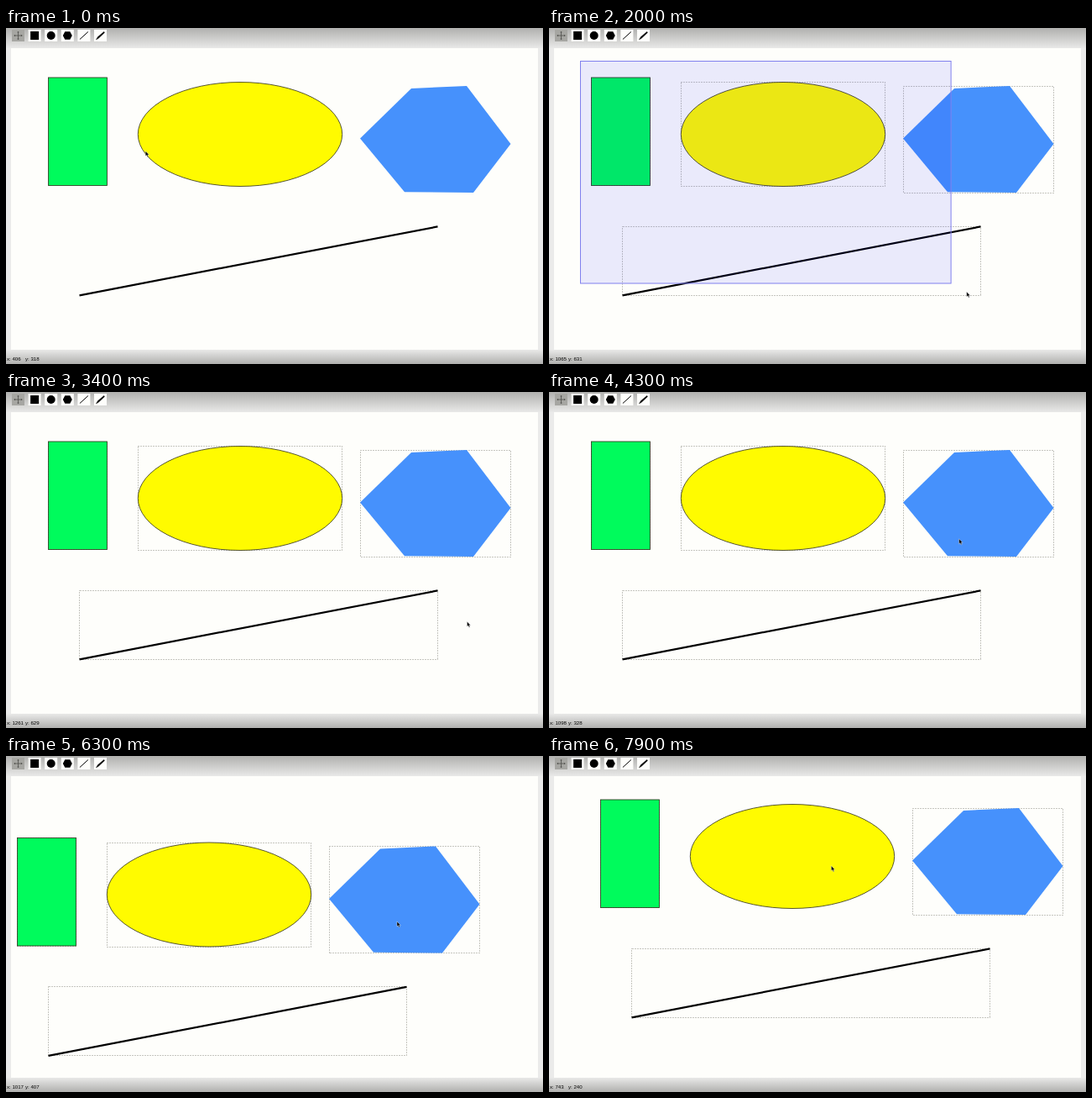
Animation, 640 px wide and 400 px high, one loop 8 s. Source, as an HTML page:

```html
<!DOCTYPE html>
<html lang="en">
<head>
<meta charset="utf-8">
<title>Shape editor</title>
<style>
  html, body { margin: 0; width: 100%; height: 100%; overflow: hidden; }
  svg { display: block; width: 640px; height: 400px; }
  text { font: 6.1px "Liberation Sans", Arial, sans-serif; fill: #000; }
  .box { fill: none; stroke: #c6c6c0; stroke-dasharray: 2 1; shape-rendering: crispEdges; }
  .edge { stroke: #2c2c18; stroke-width: .8; }
</style>
</head>
<body>
<svg viewBox="0 0 640 400">
  <defs>
    <linearGradient id="top" x2="0" y2="1">
      <stop stop-color="#b0b0ae"/>
      <stop offset="1" stop-color="#e9e9e8"/>
    </linearGradient>
    <linearGradient id="bottom" x2="0" y2="1">
      <stop stop-color="#e9e9e8"/>
      <stop offset="1" stop-color="#b0b0ae"/>
    </linearGradient>
  </defs>

  <rect width="640" height="400" fill="#ebebea"/>
  <rect width="640" height="24" fill="url(#top)"/>
  <rect y="383" width="640" height="17" fill="url(#bottom)"/>
  <rect x="6" y="24" width="628" height="359" fill="#fefefb"/>

  <g id="tools"></g>

  <g id="scene">
    <g id="boxes"></g>
    <g id="shapes">
      <rect class="edge" x="50.5" y="59" width="70" height="128.5" fill="#00fb5c"/>
      <ellipse class="edge" cx="279" cy="126.5" rx="121.7" ry="62" fill="#fffb00"/>
      <path d="M483 72L549 69L601.5 138L557 196L475 195.3L422 131.5Z" fill="#4691fc"/>
      <path d="M87.5 318.3L514.5 236.4" stroke="#000" stroke-width="2.2"/>
    </g>
  </g>

  <rect id="marquee" x="37.5" y="39.5" fill="#00f" fill-opacity=".08" stroke="#8080ee"/>

  <text id="xText" x="1" y="396.3"></text>
  <text id="yText" x="23" y="396.3"></text>
  <path id="cursor" d="M0 0V6L1.4 4.8L2.4 7L3.5 6.5L2.5 4.5H4.3Z" fill="#000" stroke="#fff" stroke-width=".4"/>
</svg>
<script>
const LOOP = 8000, STEP = 100;
const SELECT = { from: 1300, to: 3000 };
const DRAGS = [{ from: 4200, to: 5800 }, { from: 6200, to: 7000 }];
const ELLIPSE_CLICK = 7800;

// Pointer moves; it rests between them
const START = { x: 187, y: 165.3 };
const MOVES = [
  { from: -100, to: 600, x: 80, y: 68 },
  { from: 700, to: 1200, x: 37, y: 40 },
  { from: 1300, to: 1900, x: 479.1, y: 304 },
  { from: 1900, to: 2800, x: 601.4, y: 369.5 },
  { from: 3100, to: 3900, x: 493.7, y: 169.7 },
  { from: 4200, to: 5100, x: 460.4, y: 203.5 },
  { from: 5100, to: 5800, x: 456.7, y: 208.2 },
  { from: 5800, to: 6000, x: 457.8, y: 204.7 },
  { from: 6200, to: 7000, x: 505.8, y: 159.2 },
  { from: 7100, to: 7700, x: 336.4, y: 130.7 }
];

const $ = id => document.getElementById(id);
const clamp = (v, { from, to }) => Math.min(to, Math.max(from, v));
const easeOut = p => 1 - (1 - p) ** 1.4;

function add(parent, tag, attrs) {
  const el = document.createElementNS("http://www.w3.org/2000/svg", tag);
  for (const name in attrs) el.setAttribute(name, attrs[name]);
  return parent.appendChild(el);
}

function pointer(t) {
  let { x, y } = START;
  for (const move of MOVES) {
    const p = easeOut((clamp(t, move) - move.from) / (move.to - move.from));
    x += (move.x - x) * p;
    y += (move.y - y) * p;
  }
  return { x, y };
}

const ICONS = [
  { d: "M-5 0H5M0 -5V5M-1 -4H1M-1 4H1M-4 -1V1M4 -1V1", stroke: "#50504c", "stroke-width": .8 },
  { d: "M-5 -5H5V5H-5Z" },
  { d: "M-5 0A5 5 0 1 1 5 0A5 5 0 1 1 -5 0Z" },
  { d: "M-5.5 0L-3 -4.8H3L5.5 0L3 4.8H-3Z" },
  { d: "M-5 4.5L5 -4.5", stroke: "#000" },
  { d: "M-5 4.8L-3 1.6L4.2 -4.6L5 -3.6L-2 3Z", stroke: "#000", "stroke-width": .5 }
];
ICONS.forEach((icon, i) => {
  const g = add($("tools"), "g", { transform: `translate(${14.5 + i * 19.6} 9)` });
  add(g, "rect", { x: -7.5, y: -7, width: 15, height: 14, fill: i ? "#fefefb" : "#a6a6a2" });
  add(g, "path", icon);
});

const items = [...$("shapes").children].map(shape => {
  const { x, y, width, height } = shape.getBBox();
  const box = add($("boxes"), "rect", { class: "box", x, y, width, height });
  return { shape, box, x, y };
});

function draw(t) {
  const seen = t - STEP; // the editor trails the pointer by one step
  const tip = pointer(t), { x, y } = pointer(seen);

  let dx = 0, dy = 0;
  for (const drag of DRAGS) {
    const a = pointer(drag.from), b = pointer(clamp(seen, drag));
    dx += b.x - a.x;
    dy += b.y - a.y;
  }
  $("scene").setAttribute("transform", `translate(${dx} ${dy})`);

  const corner = pointer(clamp(seen, SELECT));
  for (const { shape, box, x, y } of items) {
    const hit = corner.x >= x && corner.y >= y;
    const dropped = shape.tagName === "ellipse" && t >= ELLIPSE_CLICK;
    box.style.display = hit && !dropped ? "" : "none";
  }

  const marquee = $("marquee");
  marquee.style.display = seen > SELECT.from && seen <= SELECT.to ? "" : "none";
  marquee.setAttribute("width", Math.max(0, corner.x - 37.5));
  marquee.setAttribute("height", Math.max(0, corner.y - 39.5));

  $("xText").textContent = "x: " + Math.round((x - 7.2) * 2.257);
  $("yText").textContent = "y: " + Math.round((y - 24.4) * 2.257);
  $("cursor").setAttribute("transform", `translate(${tip.x} ${tip.y})`);
}

const start = performance.now();
function tick() {
  const t = (performance.now() - start) % LOOP;
  draw(Math.floor(t / STEP) * STEP);
  requestAnimationFrame(tick);
}
tick();
</script>
</body>
</html>
```
